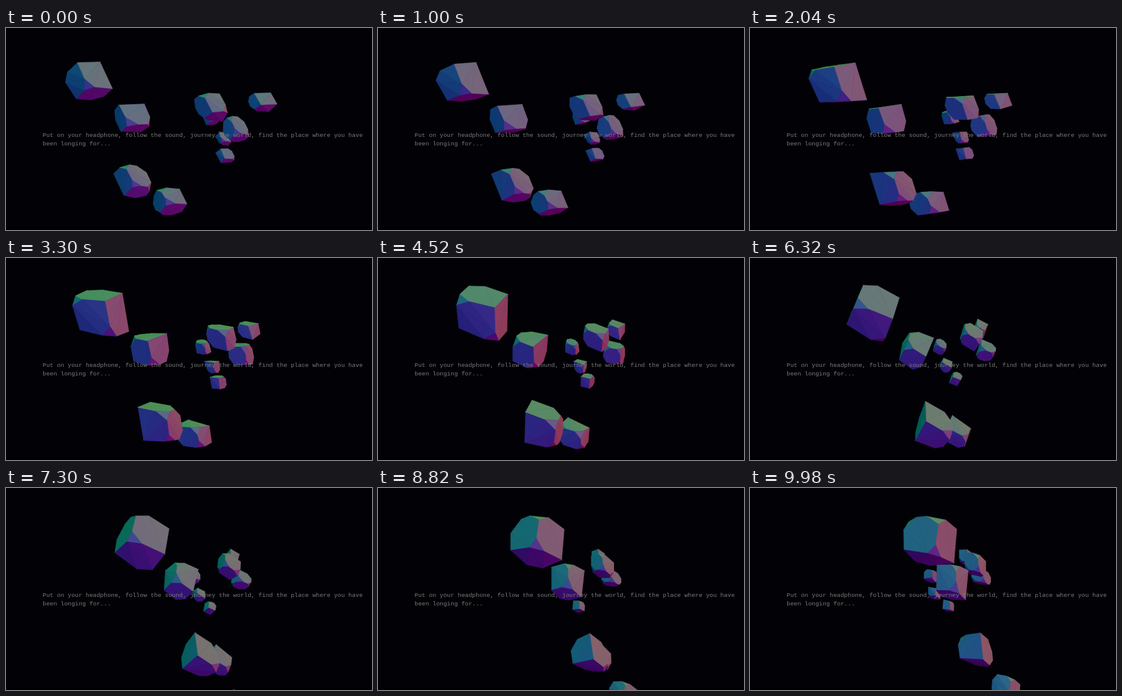
Animation, 600 px wide and 332 px high, one loop 10000 ms. Source, as an HTML page with a canvas:

```html
<!DOCTYPE html>
<html lang="en">
<head>
<meta charset="utf-8">
<title>Drifting rocks</title>
<style>
  html, body { margin: 0; height: 100%; overflow: hidden; background: #020206; }
  canvas { display: block; }
</style>
</head>
<body>
<canvas id="stage" width="600" height="332"></canvas>
<script>
const ctx = document.getElementById('stage').getContext('2d');
const LOOP = 10, REST = 4.52;
const SPIN = 0.26, AXIS = [0.69, 0.655, -0.31];
const GLOW = 0.57 * 255;
// Box directions as seen at REST: up, left-front, right
const SIDES = [[0, 0.83, 0.55], [-0.32, -0.35, 0.88], [0.87, -0.3, 0.27]];

const sub = (a, b) => a.map((v, i) => v - b[i]);
const dot = (a, b) => a[0] * b[0] + a[1] * b[1] + a[2] * b[2];
const cross = (a, b) => [a[1] * b[2] - a[2] * b[1], a[2] * b[0] - a[0] * b[2], a[0] * b[1] - a[1] * b[0]];
const mix = (a, b, k) => a.map((v, i) => v + (b[i] - v) * k);

let seed = 4242;
const random = () => (seed = seed * 16807 % 2147483647) / 2147483647;
const jitter = amount => (random() * 2 - 1) * amount;

// Rodrigues rotation about AXIS
function turn(v, angle) {
  const c = Math.cos(angle), s = Math.sin(angle);
  const k = cross(AXIS, v), d = dot(AXIS, v) * (1 - c);
  return v.map((n, i) => n * c + k[i] * s + AXIS[i] * d);
}

function hull(points) {
  const faces = [], n = points.length;
  for (let a = 0; a < n; a++) for (let b = a + 1; b < n; b++) for (let c = b + 1; c < n; c++) {
    let normal = cross(sub(points[b], points[a]), sub(points[c], points[a]));
    const size = Math.hypot(...normal);
    if (size < 1e-6) continue;
    normal = normal.map(v => v / size);
    const heights = points.map(p => dot(normal, sub(p, points[a])));
    if (heights.every(h => h < 1e-6)) faces.push({ ids: [a, b, c], normal });
    else if (heights.every(h => h > -1e-6)) faces.push({ ids: [a, b, c], normal: normal.map(v => -v) });
  }
  return faces;
}

// A box with shaken corners, some of them cut off
function chisel() {
  const lengths = SIDES.map(() => 1 + jitter(0.12));
  const corners = Array.from({ length: 8 }, (_, id) => {
    const along = lengths.map((len, i) => (id >> i & 1 ? len : -len) + jitter(0.2));
    return [0, 1, 2].map(axis => SIDES.reduce((sum, side, i) => sum + side[axis] * along[i], 0));
  });
  return corners.flatMap((corner, id) => random() < 0.5
    ? [1, 2, 4].map(bit => mix(corner, corners[id ^ bit], 0.3 + jitter(0.08)))
    : [corner]);
}

// from, to: [x, y, size]; bend: how far the middle of the path bows out
function rock(from, to, bend = [0, 0, 0]) {
  const points = chisel();
  return { points, faces: hull(points), from, to, bend };
}

// Far to near
const rocks = [
  rock([421, 122, 39], [353, 113, 22]),
  rock([337, 147, 26], [296, 145, 22]),
  rock([356, 182, 24], [302, 173, 20]),
  rock([359, 210, 27], [325, 193, 19]),
  rock([377, 166, 42], [379, 146, 28], [9, -2, 1]),
  rock([336, 130, 50], [369, 126, 37], [7, 3, 0]),
  rock([136, 87, 70], [296, 87, 84], [-38, 4, 11]),
  rock([269, 285, 50], [373, 272, 38], [5, 9, 7]),
  rock([207, 148, 52], [332, 155, 55], [-14, 0, 5]),
  rock([207, 252, 58], [370, 266, 56], [-9, 14, 13]),
  rock([275, 424, 47], [420, 332, 49]),
];

function drawRock({ points, faces, from, to, bend }, t) {
  const k = t / LOOP, bow = 4 * k * (1 - k);
  const [x, y, size] = mix(from, to, k).map((v, i) => v + bend[i] * bow);
  const angle = SPIN * (t - REST);
  const turned = points.map(p => turn(p, angle));
  const span = axis => {
    const values = turned.map(p => p[axis]);
    const low = Math.min(...values), high = Math.max(...values);
    return { middle: (low + high) / 2, length: high - low };
  };
  const wide = span(0), tall = span(1);
  const scale = 2 * size / (wide.length + tall.length);
  const place = p => [x + (p[0] - wide.middle) * scale, y - (p[1] - tall.middle) * scale];
  for (const { ids, normal } of faces) {
    const n = turn(normal, angle);
    if (n[2] <= 0) continue;
    // The facing direction sets the colour
    const rgb = n.map(v => Math.round((v + 1) / 2 * GLOW));
    ctx.fillStyle = ctx.strokeStyle = `rgb(${rgb})`;
    ctx.beginPath();
    ids.forEach(i => ctx.lineTo(...place(turned[i])));
    ctx.closePath();
    ctx.fill();
    ctx.stroke();
  }
}

function draw(now) {
  ctx.fillStyle = '#020206';
  ctx.fillRect(0, 0, 600, 332);
  ctx.fillStyle = '#000';
  ctx.fillRect(0, 328, 600, 4);
  ctx.lineWidth = 0.6;
  ctx.lineJoin = 'round';
  rocks.forEach(r => drawRock(r, now / 1000 % LOOP));
  ctx.font = '9.83px "Courier New", "Liberation Mono", monospace';
  ctx.fillStyle = '#7c7c7c';
  ctx.fillText('Put on your headphone, follow the sound, journey the world, find the place where you have', 60, 178.5);
  ctx.fillText('been longing for...', 60, 192.5);
  requestAnimationFrame(draw);
}
requestAnimationFrame(draw);
</script>
</body>
</html>
```
